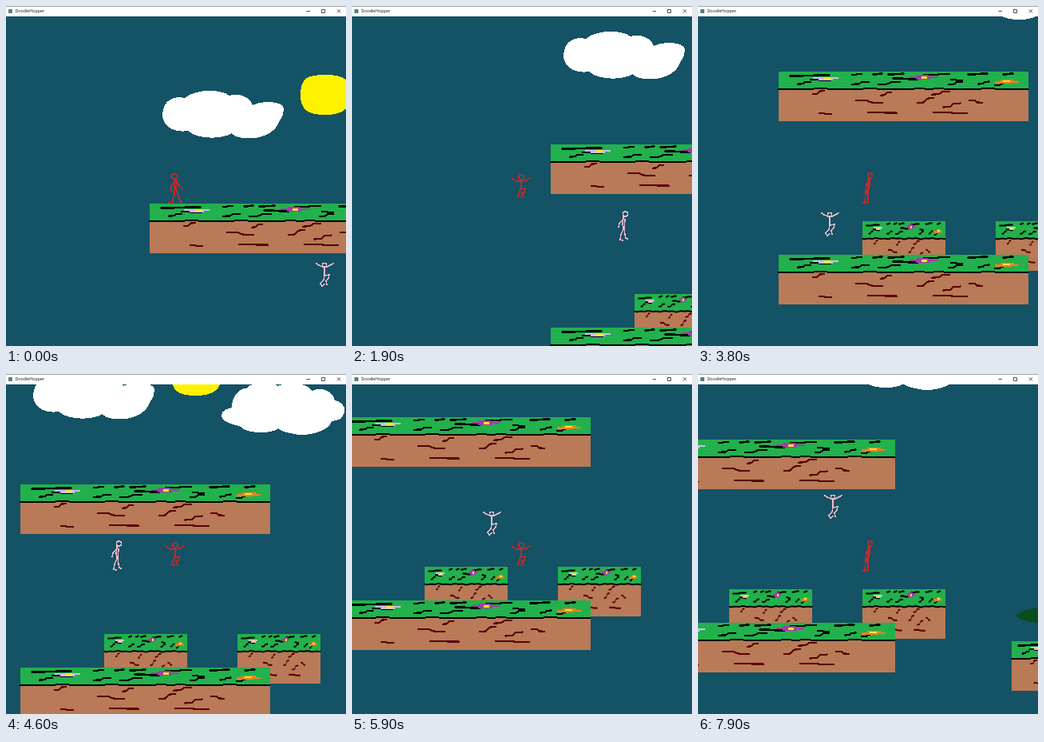
Recreate the animation shown at these times as an HTML page. Size 426 by 425 pixels, loop 8 s.

```html
<!DOCTYPE html>
<html lang="en">
<head>
<meta charset="utf-8">
<style>
  html, body { margin: 0; height: 100%; overflow: hidden; background: #145266; }
  svg { display: block; width: 100vw; height: 100vh; }
  .line { fill: none; stroke-linecap: round; stroke-linejoin: round; }
  #world, #hero { shape-rendering: crispEdges; }
</style>
</head>
<body>
<svg viewBox="0 0 426 425">
  <defs>
    <g id="tile">
      <rect width="313" height="62" fill="#b97a57"/>
      <rect width="313" height="22" fill="#22b14c"/>
      <path id="seam" class="line" stroke="#000" stroke-width="2"/>
      <path id="grass" class="line" stroke="#000" stroke-width="2.2"/>
      <path id="soil" class="line" stroke="#5a0008" stroke-width="2.2"/>
      <path fill="#cbbcf2" d="M43 7 H75 V9 H68 V11 H50 V9 H43Z"/>
      <path fill="#a03ca8" d="M164 6 H173 V4 H188 V6 H199 V8 H190 V10 H172 V8 H164Z"/>
      <path fill="#f57f20" d="M271 12 H278 V10 H295 V12 H301 V14 H292 V15 H271Z"/>
      <path fill="#ffe52b" d="M57 7 h8 v3 h-8Z M179 6 h7 v3 h-7Z M281 11 h9 v2 h-9Z"/>
    </g>

    <g id="hero-ground" class="line">
      <ellipse cx="-1" cy="-34" rx="4" ry="3"/>
      <path d="M0 -30 L-1 -20 -1 -11 -3 -5 -3 -2 -8 -1 M2 -29 L1 -20 3 -11 5 -7 6 -2 8 -2 M-1 -27 L-5 -22 -5 -15 M1 -27 L5 -23 9 -18"/>
    </g>
    <g id="hero-rise" class="line">
      <ellipse cx="3.5" cy="-35" rx="2.5" ry="3.5"/>
      <path d="M2 -31 L-1 -24 -2 -14 -3 -1 -5 -1 M3 -31 L3 -22 1 -14 1 -2 -1 -1 M1 -26 L0 -12"/>
    </g>
    <g id="hero-fall" class="line">
      <ellipse cx="0" cy="-33" rx="3.5" ry="2.8"/>
      <path d="M-11 -31 L-6 -28 0 -28 6 -29 11 -32 M0 -29 L0 -18 5 -19 4 -14 1 -13 3 -8 M-1 -18 L-3 -13 -4 -9 -1 -8"/>
    </g>
    <g id="chaser-fall" class="line">
      <ellipse cx="0" cy="-27" rx="2.6" ry="2.8"/>
      <path d="M-10 -29 L-7 -27 -2 -25 3 -25 11 -29 M0 -24 L0 -14 6 -15 5 -11 2 -7 3 -3 M0 -14 L-1 -9 -5 -4 -3 -1 0 -3"/>
    </g>
    <g id="chaser-rise" class="line">
      <ellipse cx="2.5" cy="-34" rx="3.3" ry="3"/>
      <path d="M0 -30 L-1 -22 0 -15 -3 -8 -4 -2 -1 -1 M0 -28 L-5 -22 -6 -18 M2 -27 L1 -16 2 -8 3 -4 5 -3"/>
    </g>
  </defs>

  <g id="world">
    <path fill="#fff200" d="M189 -136 C189 -157 198 -161 220 -161 C244 -161 252 -155 252 -136 C252 -119 242 -111 220 -111 C198 -111 189 -117 189 -136Z"/>
    <path fill="#fff" transform="translate(-180 -247)" d="M196 137 C197 118 208 112 224 115 C236 104 268 103 280 112 C290 108 306 113 309 124 C320 118 350 118 348 130 C347 140 342 143 341 147 C335 162 312 167 300 165 C290 165 285 162 283 159 C270 167 240 167 228 156 C210 159 197 150 196 137Z"/>
    <path fill="#fff" transform="translate(-18 -138)" d="M270 52 C270 45 278 43 283 42 C283 25 295 17 301 18 C310 8 333 9 341 15 C355 8 378 12 384 21 C395 15 411 22 412 33 C424 35 427 46 422 52 C420 58 412 58 408 59 C405 72 375 80 357 74 C348 73 343 70 342 68 C330 76 300 74 294 66 C283 62 270 60 270 52Z"/>
    <path fill="#0b4d1e" d="M463 220 L474 214 484 211 500 210 525 214 V226 L500 230 482 228 472 225Z"/>
    <use href="#tile" transform="translate(105 187) scale(.333 1)"/>
    <use href="#tile" transform="translate(272 187) scale(.333 1)"/>
    <use href="#tile" transform="translate(459 252) scale(.55 1)"/>
    <use href="#tile" y="229"/>
    <use href="#tile"/>
    <use id="chaser" stroke="#f6bccb" stroke-width="1.5"/>
  </g>
  <use id="hero" x="212" y="247" stroke="#c22a2a" stroke-width="1.7"/>

  <rect width="426" height="13" fill="#fff"/>
  <rect width="426" height=".7" fill="#777"/>
  <rect x="3" y="4" width="5" height="5" fill="#4d8a7c"/>
  <text x="11.5" y="8.4" font-family="'Open Sans', 'Noto Sans', sans-serif" font-size="5.3" fill="#111">DoodleHopper</text>
  <path fill="none" stroke="#222" stroke-width=".8" d="M376.5 6.5 H381 M395.5 4.5 H399.5 V8.5 H395.5Z M414.8 4.3 L419 8.5 M419 4.3 L414.8 8.5"/>
</svg>
<script>
const LOOP = 8000, STEP = 100;
const HERO_Y = 247, HERO_X = 212;
const $ = id => document.getElementById(id);

// Brush marks: a row of S-shaped dashes, given as [x, width] pairs.
const dash = (x, y, w, tilt) =>
  `M${x} ${y - tilt / 2} l${w * .4} ${tilt * .1} ${w * .2} ${tilt * .8} ${w * .4} ${tilt * .1}`;
const row = (y, slope, ...marks) =>
  marks.map(([x, w]) => dash(x, y + Math.sin(x), w, slope)).join('');

$('grass').setAttribute('d',
  row(4, -1, [14, 50], [92, 12], [118, 12], [137, 20], [182, 32], [237, 25], [281, 13]) +
  row(10, 1, [40, 25], [143, 32], [216, 14]) +
  row(15, -3, [24, 16], [92, 21], [125, 27], [213, 17], [250, 14], [271, 14]));
$('soil').setAttribute('d',
  row(27, -4, [43, 14], [128, 13], [192, 22]) +
  row(37, 3, [97, 33], [239, 16]) + row(37, -6, [174, 20]) + row(43, -5, [206, 22]) +
  row(52, 1, [51, 15], [112, 36], [194, 42]));
$('seam').setAttribute('d', 'M' + Array.from({ length: 53 }, (_, i) =>
  `${i * 6} ${21.7 + .8 * Math.sin(i * .9) * Math.cos(i * .35)}`).join(' '));

// Falling speeds up to a limit; a jump is an ease-out to its peak followed by a fall.
const GRAVITY = 95, MAX_FALL = 93.5;
function drop(ms) {
  const s = ms / 1000, ramp = MAX_FALL / GRAVITY;
  return s < ramp ? GRAVITY * s * s / 2 : MAX_FALL * (s - ramp / 2);
}
function hopAt(hops, t) {
  const { launch, top, from, peak, floor } = hops.findLast(hop => hop.launch <= t);
  if (t < top) {
    const left = (top - t) / (top - launch);
    return { y: peak + (from - peak) * left * left, pose: from > peak ? 'rise' : 'ground' };
  }
  const y = peak + drop(t - top);
  return y < floor ? { y, pose: 'fall' } : { y: floor, pose: 'ground' };
}

// Height zero is the top of the upper ledge, and 229 the top of the lower one.
const LOW = 229, BLOCK = 187;
const heroJump = launch => ({ launch, top: launch + 1022, from: LOW, peak: 108.5, floor: LOW });
const hero = {
  hops: [{ launch: 0, top: 620, from: 0, peak: 0, floor: LOW }, heroJump(3478), heroJump(7578)],
  path: [[0, 32], [1100, -27], [2000, -38], [3800, 111], [4600, 194], [5400, 199], [5900, 226], [7900, 278]]
};
const chaser = {
  hops: [
    { launch: 0, top: 0, from: 104, peak: 104, floor: BLOCK },
    { launch: 1600, top: 2180, from: BLOCK, peak: 101, floor: LOW },
    { launch: 3950, top: 4860, from: LOW, peak: 97, floor: LOW },
    { launch: 7100, top: 7650, from: LOW, peak: 96, floor: LOW }
  ],
  path: [[0, 219], [1100, 148], [3030, 10], [4600, 121], [5900, 189], [7900, 235]]
};

function along(path, t) {
  const i = path.findIndex(([time]) => time > t);
  if (i < 0) return path.at(-1)[1];
  const [t0, a] = path[i - 1], [t1, b] = path[i];
  return a + (b - a) * (t - t0) / (t1 - t0);
}

function draw(time) {
  const t = Math.floor(time % LOOP / STEP) * STEP;
  const me = hopAt(hero.hops, t), other = hopAt(chaser.hops, t);
  const cameraX = Math.round(HERO_X - along(hero.path, t));
  const cameraY = Math.round(HERO_Y - me.y);
  $('world').setAttribute('transform', `translate(${cameraX} ${cameraY})`);
  $('hero').setAttribute('href', '#hero-' + me.pose);
  $('chaser').setAttribute('x', Math.round(along(chaser.path, t)));
  $('chaser').setAttribute('y', Math.round(other.y));
  $('chaser').setAttribute('href', other.pose === 'fall' ? '#chaser-fall' : '#chaser-rise');
}

const start = performance.now();
function tick() {
  draw(performance.now() - start);
  requestAnimationFrame(tick);
}
tick();
</script>
</body>
</html>
```
